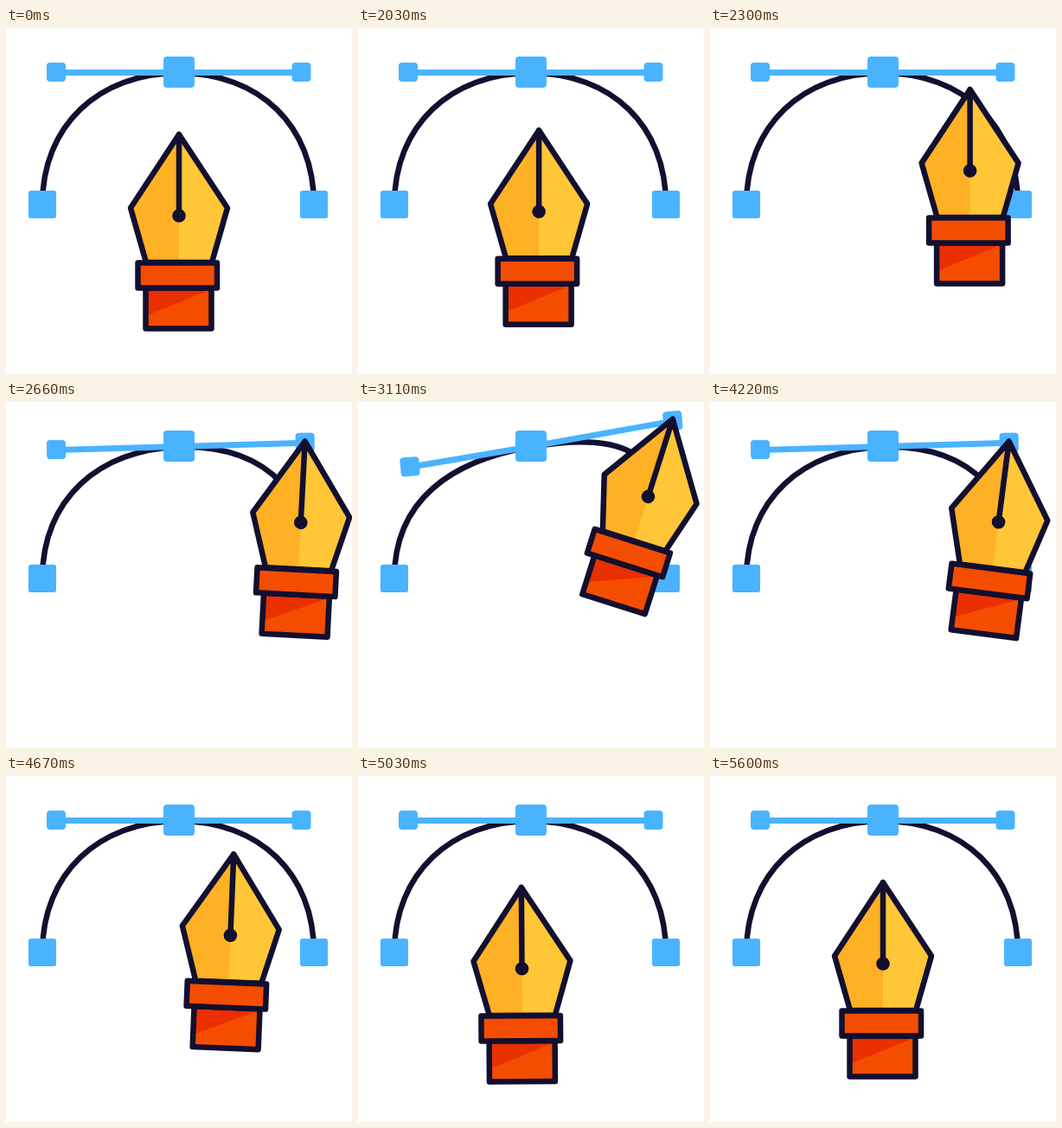
An HTML page for the animation above (5.63 s loop, 400 px wide and 400 px high).

```html
<!DOCTYPE html>
<html lang="en">
<head>
<meta charset="utf-8">
<title>Pen tool</title>
<style>
  html, body { margin: 0; width: 100%; height: 100%; overflow: hidden; background: #fff; }
  svg { display: block; width: 100vw; height: 100vh; }
  .ink { stroke: #120f2f; stroke-width: 6.5; stroke-linejoin: round; stroke-linecap: round; }
  .blue { fill: #4ab3ff; }
</style>
</head>
<body>
<svg viewBox="0 0 400 400">
  <path id="curve" class="ink" fill="none"/>
  <path id="bar" fill="none" stroke="#4ab3ff" stroke-width="7" transform="translate(0 .5)"/>
  <rect id="left" class="blue" x="-11" y="-11" width="22" height="22" rx="4"/>
  <rect id="right" class="blue" x="-11" y="-11" width="22" height="22" rx="4"/>
  <rect class="blue" x="182" y="33" width="36" height="36" rx="4"/>
  <rect class="blue" x="26" y="188" width="32" height="32" rx="2.5"/>
  <rect class="blue" x="340" y="188" width="32" height="32" rx="2.5"/>
  <!-- The pen's origin is its tip -->
  <g id="pen">
    <path fill="#ffc637" d="M0 0L56 85L38 148H-38L-56 85Z"/>
    <path fill="#ffb125" d="M0 0V148H-38L-56 85Z"/>
    <path class="ink" fill="none" d="M0 94V0L56 85L38 148H-38L-56 85L0 0"/>
    <circle cy="94" r="7.8" fill="#120f2f"/>
    <path fill="#f44d00" d="M-38.5 177.5H37.5V224.5H-38.5Z"/>
    <path fill="#ea2f00" d="M-38.5 177.5H37.5V179L-38.5 210Z"/>
    <path class="ink" fill="none" d="M-38.5 177.5H37.5V224.5H-38.5Z"/>
    <path class="ink" fill="#f44d00" d="M-47.5 148.5H44V177.5H-47.5Z"/>
  </g>
</svg>
<script>
const LOOP = 5630, STEP = 30, START = 2030, PEAK = 3440, RELEASE = 4340;
const DRAG = 900, GLIDE = 650, SETTLE = 500, OVERSHOOT = 0.08;
const REST = { x: 200, y: 123 }, MID = { x: 200, y: 51 };

const el = id => document.getElementById(id);
const clamp = v => Math.min(1, Math.max(0, v));
const mix = (a, b, k) => a + (b - a) * k;
const sine = p => (1 - Math.cos(Math.PI * clamp(p))) / 2;

// Cubic easing with control points (.25, .1) and (.25, 1)
function ease(p) {
  const bezier = (a, b, s) => 3 * a * s * (1 - s) ** 2 + 3 * b * s * s * (1 - s) + s ** 3;
  let low = 0, high = 1;
  for (let i = 0; i < 20; i++) {
    const s = (low + high) / 2;
    if (bezier(0.25, 0.25, s) < p) low = s; else high = s;
  }
  return bezier(0.1, 1, low);
}

// Progress of the glide home, with one overshoot
function homeward(t) {
  const since = t - RELEASE;
  return since < GLIDE
    ? (1 + OVERSHOOT) * sine(since / GLIDE)
    : 1 + OVERSHOOT * (1 - sine((since - GLIDE) / SETTLE));
}

function polar(length, degrees) {
  const angle = degrees * Math.PI / 180;
  return { x: MID.x + length * Math.cos(angle), y: MID.y - length * Math.sin(angle) };
}

function draw(t) {
  const drag = ease(clamp(1 - Math.abs(t - PEAK) / DRAG));
  const away = t < START ? 0 : 1 - homeward(t < PEAK ? 6865 - t : t);
  const turn = t < PEAK ? 19.4 * drag : 5.2 * away + 14.2 * drag;

  const tiltLeft = 10.6 * drag, tiltRight = 11.2 * drag;
  const a = polar(-142, tiltLeft), b = polar(141.5 + 27.5 * drag, tiltRight);
  const c = polar(-93, tiltLeft), d = polar(93 + 86 * drag, tiltRight);
  const place = (id, p, turned) =>
    el(id).setAttribute("transform", `translate(${p.x} ${p.y}) rotate(${turned})`);

  el("curve").setAttribute("d",
    `M42 204C42 113 ${c.x} ${c.y + 1} 200 52C${d.x} ${d.y + 1} 356 113 356 204`);
  el("bar").setAttribute("d", `M${a.x} ${a.y}L${MID.x} ${MID.y}L${b.x} ${b.y}`);
  place("left", a, -tiltLeft / 2);
  place("right", b, -tiltRight / 2);
  place("pen", { x: mix(REST.x, b.x, away), y: mix(REST.y, b.y - 1 - drag, away) }, turn);
}

function tick() {
  const t = performance.now() % LOOP;
  draw(t < START ? 0 : t - (t - START) % STEP);
  requestAnimationFrame(tick);
}
tick();
</script>
</body>
</html>
```
